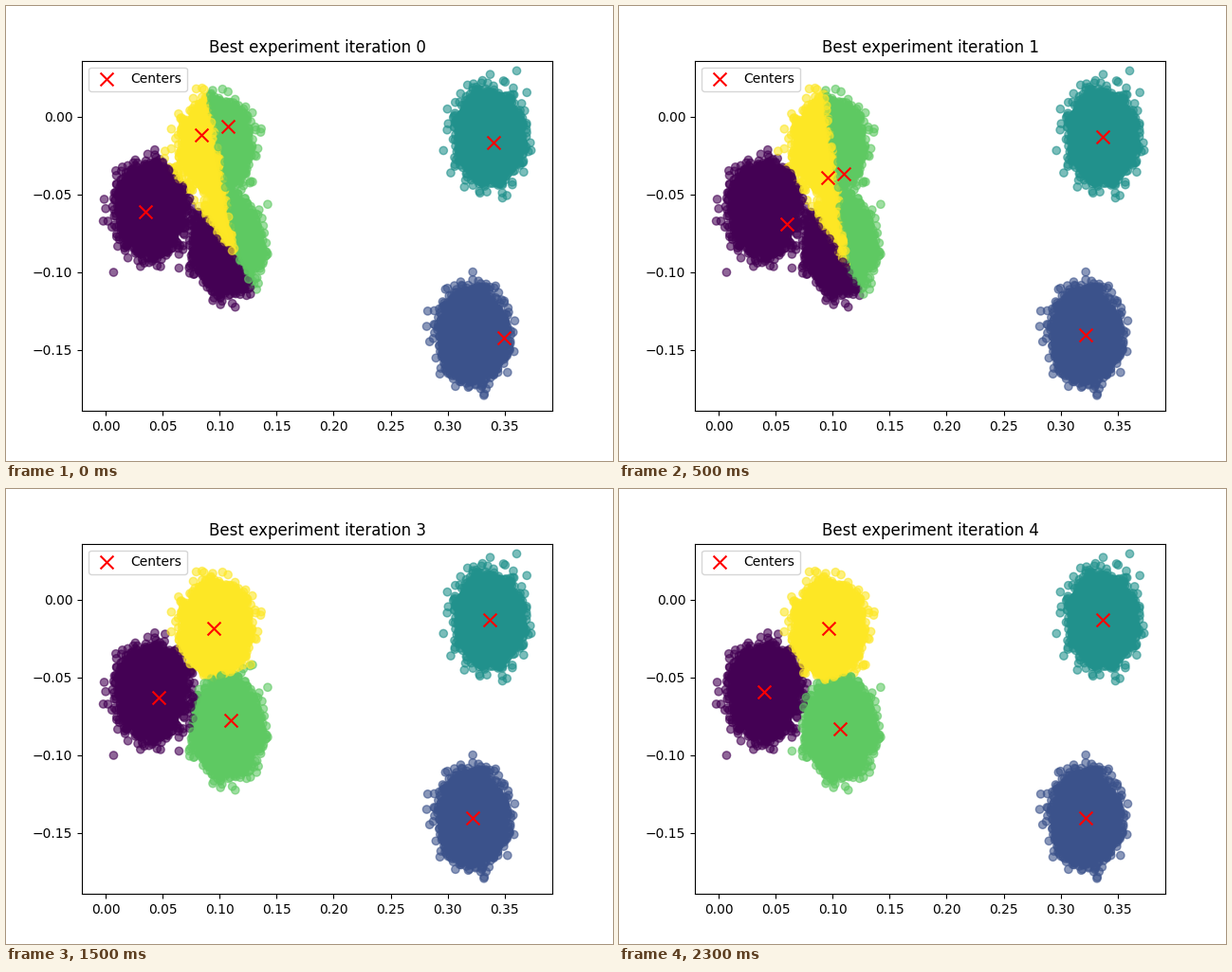
Animation, 640 px wide and 480 px high, one loop 2.5 s. Source, as a matplotlib script:

```python
import numpy as np
import matplotlib.pyplot as plt
from matplotlib.animation import FuncAnimation

XLIM = (-0.02098, 0.39192)
YLIM = (-0.18931, 0.03609)
PER_BLOB = 10000
SIGMA = 0.0104

# Stage pixels, in label order: purple, blue, teal, green, yellow.
MIDDLES = [(153, 214), (492, 347), (510, 138), (233, 253), (221, 147)]

# Centers that are away from their blob's middle, per iteration and label.
MOVES = [
    {0: (147, 217), 1: (525, 350), 2: (514, 144), 3: (234, 127), 4: (206, 136)},
    {0: (177, 230), 3: (237, 177), 4: (220, 181)},
    {0: (173, 228), 3: (238, 190), 4: (219, 180)},
    {0: (161, 220), 3: (237, 244), 4: (219, 147)},
    {},
]


def to_data(points):
    """Convert stage pixels (origin top left) to data coordinates."""
    x, y = np.asarray(points, float).T + 0.3
    return np.column_stack([
        XLIM[0] + (x - 80) / 496 * (XLIM[1] - XLIM[0]),
        YLIM[1] - (y - 57.6) / 369.6 * (YLIM[1] - YLIM[0]),
    ])


def make_points():
    rng = np.random.default_rng(4)
    middles = np.repeat(to_data(MIDDLES), PER_BLOB, axis=0)
    return rng.permutation(rng.normal(middles, SIGMA))


def nearest(points, centers):
    gaps = points[:, None, :] - centers[None, :, :]
    return (gaps ** 2).sum(axis=2).argmin(axis=1)


points = make_points()
centers = [to_data([moved.get(k, middle) for k, middle in enumerate(MIDDLES)])
           for moved in MOVES]
labels = [nearest(points, c) for c in centers]

fig, ax = plt.subplots(figsize=(6.4, 4.8), dpi=100)
cloud = ax.scatter(*points.T, c=labels[0], cmap="viridis", vmin=0, vmax=4,
                   alpha=0.6)
crosses = ax.scatter(*centers[0].T, c="red", marker="x", s=100,
                     label="Centers")
ax.set_xlim(XLIM)
ax.set_ylim(YLIM)
ax.legend(loc="upper left")
title = ax.set_title("Best experiment iteration 0")


def update(i):
    cloud.set_array(labels[i])
    crosses.set_offsets(centers[i])
    title.set_text(f"Best experiment iteration {i}")
    return cloud, crosses, title


anim = FuncAnimation(fig, update, frames=len(MOVES), interval=500,
                     repeat=True, repeat_delay=0)
plt.show()
```
